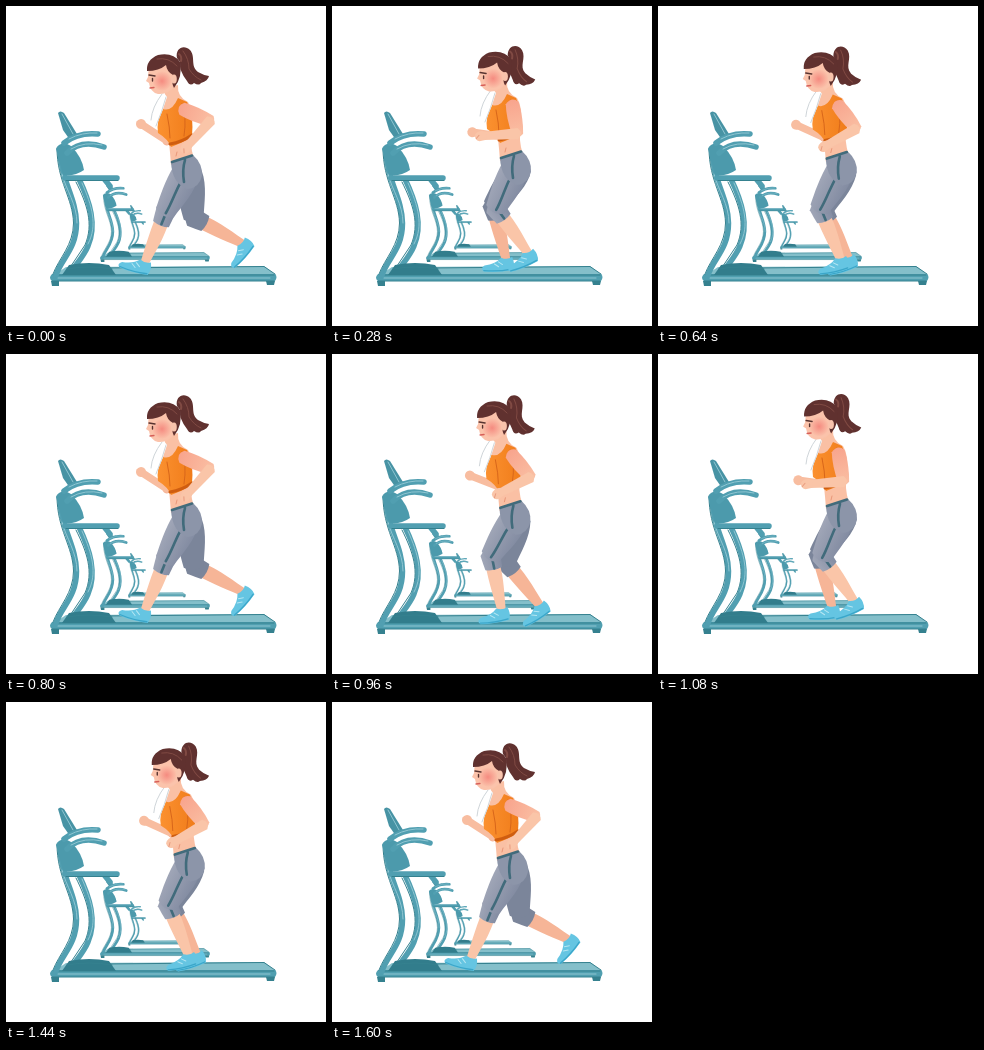
An HTML page without scripts that plays this animation: 320x320 px, repeating every 1640 ms.

```html
<!DOCTYPE html>
<html lang="en">
<head>
<meta charset="utf-8">
<title>Treadmill run</title>
<style>
/* n = near side, f = far side; t thigh, s shin, k foot, u upper arm, a forearm; p = ponytail */
@property --nt { syntax: "<angle>"; inherits: true; initial-value: 0deg }
@property --ns { syntax: "<angle>"; inherits: true; initial-value: 0deg }
@property --nk { syntax: "<angle>"; inherits: true; initial-value: 0deg }
@property --ft { syntax: "<angle>"; inherits: true; initial-value: 0deg }
@property --fs { syntax: "<angle>"; inherits: true; initial-value: 0deg }
@property --fk { syntax: "<angle>"; inherits: true; initial-value: 0deg }
@property --nu { syntax: "<angle>"; inherits: true; initial-value: 0deg }
@property --na { syntax: "<angle>"; inherits: true; initial-value: 0deg }
@property --fu { syntax: "<angle>"; inherits: true; initial-value: 0deg }
@property --fa { syntax: "<angle>"; inherits: true; initial-value: 0deg }
@property --p { syntax: "<angle>"; inherits: true; initial-value: 0deg }
@property --x { syntax: "<length>"; inherits: true; initial-value: 0px }
@property --y { syntax: "<length>"; inherits: true; initial-value: 0px }

html, body { margin: 0; width: 100%; height: 100%; overflow: hidden; background: #fff }
svg { display: block; width: 100vw; height: 100vh }

/* Two 800 ms strides, then one 40 ms hold; steps of 40 ms */
@keyframes run {
  0%, 48.7805%, 97.561%, 100% {
    --nt: 28deg; --ns: -6deg; --nk: -7deg; --ft: -6deg; --fs: -56deg; --fk: 14deg;
    --nu: -67deg; --na: 109deg; --fu: 4deg; --fa: 119deg; --p: 0deg; --x: 0px; --y: 0px;
    animation-timing-function: steps(2);
  }
  4.878%, 53.6585% {
    --nt: 37deg; --ns: -32deg; --nk: -5deg; --ft: 2.5deg; --fs: -57deg; --fk: 4deg;
    --nu: -60deg; --na: 108deg; --fu: 2deg; --fa: 118deg; --p: 10deg; --x: 2px; --y: -1px;
    animation-timing-function: steps(5);
  }
  17.0732%, 65.8537% {
    --nt: 26deg; --ns: -62deg; --nk: 14deg; --ft: 35deg; --fs: -49deg; --fk: 11deg;
    --nu: -10deg; --na: 96deg; --fu: -10deg; --fa: 108deg; --p: 12deg; --x: 3px; --y: -4px;
    animation-timing-function: steps(3);
  }
  24.3902%, 73.1707% {
    --nt: -6deg; --ns: -56deg; --nk: 14deg; --ft: 28deg; --fs: -6deg; --fk: -7deg;
    --nu: -4deg; --na: 94deg; --fu: -9deg; --fa: 112deg; --p: 0deg; --x: 0px; --y: 0px;
    animation-timing-function: steps(2);
  }
  29.2683%, 78.0488% {
    --nt: 2.5deg; --ns: -57deg; --nk: 4deg; --ft: 37deg; --fs: -32deg; --fk: -5deg;
    --nu: -10deg; --na: 95deg; --fu: -5deg; --fa: 113deg; --p: 10deg; --x: 2px; --y: -1px;
    animation-timing-function: steps(5);
  }
  41.4634%, 90.2439% {
    --nt: 35deg; --ns: -49deg; --nk: 11deg; --ft: 26deg; --fs: -62deg; --fk: 14deg;
    --nu: -45deg; --na: 100deg; --fu: 0deg; --fa: 116deg; --p: 12deg; --x: 3px; --y: -4px;
    animation-timing-function: steps(3);
  }
}
#runner { animation: run 1640ms linear infinite; transform: translate(var(--x), var(--y)) }
#head { transform: translate(calc(var(--x) * .7), calc(var(--x) * .5)) }
#ponytail { transform-origin: 172px 50px; transform: rotate(var(--p)) }

.near.thigh { transform: translate(180px, 167px) rotate(var(--nt)) }
.near .shin { transform: translate(0, 44px) rotate(var(--ns)) }
.near .foot { transform: translate(0, 56px) rotate(var(--nk)) }
.far.thigh { transform: translate(183px, 168px) rotate(var(--ft)) }
.far .shin { transform: translate(0, 44px) rotate(var(--fs)) }
.far .foot { transform: translate(0, 56px) rotate(var(--fk)) }
.near.arm { transform: translate(178px, 103px) rotate(var(--nu)) }
.near .fore { transform: translate(0, 29px) rotate(var(--na)) }
.far.arm { transform: translate(163px, 106px) rotate(var(--fu)) }
.far .fore { transform: translate(0, 29px) rotate(var(--fa)) }
.far .shin { --skin: #f6b597 }

.line { fill: none; stroke-linecap: round; stroke-linejoin: round }
.tube { stroke: #519fb1; stroke-width: 5.5 }
.edge { stroke: #35818f; stroke-width: 1 }
.shine { stroke: #8fc6d2; stroke-width: 1 }
.near { --cloth: url(#cloth); --skin: #fac5a8 }
.far { --cloth: #7b859a; --skin: #f8bda0 }
.cloth { fill: var(--cloth) }
.skin { fill: var(--skin) }
.stripe { stroke: #416b7b; stroke-width: 2.6 }
</style>
</head>
<body>
<svg viewBox="0 0 320 320">
  <defs>
    <linearGradient id="cloth">
      <stop offset="0" stop-color="#a0a6b7"/>
      <stop offset="1" stop-color="#838ca2"/>
    </linearGradient>
    <linearGradient id="top">
      <stop offset="0" stop-color="#fb9130"/>
      <stop offset="1" stop-color="#f07c1a"/>
    </linearGradient>
    <linearGradient id="shoulder" x2="0" y2="1">
      <stop offset="0" stop-color="#f8a48d"/>
      <stop offset="1" stop-color="#fac0a4"/>
    </linearGradient>
    <radialGradient id="blush">
      <stop offset="0" stop-color="#f58b80"/>
      <stop offset="1" stop-color="#f58b80" stop-opacity="0"/>
    </radialGradient>

    <g id="treadmill">
      <path d="M60 261L258 260L270 269H48Z" fill="#84bfca"/>
      <path class="line edge" d="M98 262L258 260.5L269 268"/>
      <path d="M46 268H269Q272 271 269 275H46Q42 272 46 268Z" fill="#509fb0"/>
      <path class="line edge" d="M48 269H268M46 275H268"/>
      <path class="line shine" d="M52 272H264"/>
      <path d="M45 275H53V280H46ZM260 275H269L268 279H261Z" fill="#35818f"/>
      <path class="line tube" d="M73 173C84 196 91 219 82 240C78 250 71 257 65 266"/>
      <path class="line shine" d="M76 177C86 200 92 219 82 238"/>
      <path class="line tube" d="M54 142C54 174 70 190 70.5 217C70.5 243 56 252 50 269"/>
      <path class="line shine" d="M56 168C60 184 71 198 71 217"/>
      <path class="line edge" d="M51 142C51 176 67 192 67.5 217C67.5 239 53 252 47 268M70 176C81 198 88 218 79 239L63 263"/>
      <path d="M56 269L63 259Q83 255 103 259L110 269Z" fill="#327d8c"/>
      <path class="line edge" d="M61 263Q83 259 106 263"/>
      <path d="M50 143Q55 134 65 140Q76 151 78 164Q68 171 57 169Z" fill="#4c9aac"/>
      <path d="M52 107Q54 104 58 107L71 128L64 134L57 124Z" fill="#4793a4"/>
      <path class="line shine" d="M56 108L67 128"/>
      <path class="line tube" d="M58 137Q72 126 92 128M61 147Q75 133 98 141"/>
      <path class="line shine" d="M63 133Q76 126 91 127M65 143Q79 135 96 139"/>
      <path class="line tube" d="M59 172H111M99 174L104 180"/>
      <path class="line edge" d="M60 174.5H112"/>
    </g>

    <g id="shoe">
      <path d="M-5 -3Q1 0 6 -3Q9 4 6 10Q-10 12 -23 10Q-27 7 -22 4Q-11 3 -5 -3Z" fill="#65c5e2"/>
      <path class="line" d="M-23 9Q-9 11 5 9" stroke="#3ba6c9" stroke-width="1.3"/>
      <path class="line" d="M-12 3L-8 6M-8 1L-4 4" stroke="#b5e6f2"/>
    </g>
    <path id="calf" d="M-7 6C-7 27 -5 44 -4 58H4C5 44 9 25 7 6Z"/>
    <path id="cuff" d="M-10 -2Q-9 7 -8 13Q1 16 9 13L10 -2Q0 -14 -10 -2Z"/>
    <path id="thigh" d="M-14 -2C-15 18 -12 32 -10 45Q0 52 10 45C12 30 17 14 13 -2Q0 -16 -14 -2Z"/>
  </defs>

  <use href="#treadmill" transform="translate(110.8 172.1) scale(.255)"/>
  <use href="#treadmill" transform="translate(72.7 120.2) scale(.485)"/>
  <use href="#treadmill"/>

  <g id="runner">
    <g class="far arm">
      <path class="line" d="M0 0V29" stroke="#f4b092" stroke-width="9"/>
      <g class="fore">
        <path class="line" d="M0 0V29" stroke="#f8bda0" stroke-width="7.5"/>
        <circle class="skin" cy="31" r="5"/>
      </g>
    </g>

    <g class="far thigh">
      <g class="shin">
        <use class="skin" href="#calf"/>
        <g class="foot"><use href="#shoe"/></g>
        <use class="cloth" href="#cuff"/>
      </g>
      <use class="cloth" href="#thigh"/>
    </g>

    <!-- torso -->
    <path d="M160 82L172 79Q171 91 182 96Q188 105 186 125Q183 137 188 153L165 159Q164 145 163 137L154 110Z" fill="#fac0a4"/>
    <path class="line" d="M171 146l-1 4" stroke="#e89779"/>

    <g class="near thigh">
      <g class="shin">
        <use class="skin" href="#calf"/>
        <g class="foot"><use href="#shoe"/></g>
        <use class="cloth" href="#cuff"/>
        <path class="line stripe" d="M1 0V13"/>
      </g>
      <use class="cloth" href="#thigh"/>
      <path class="line stripe" d="M1 -6C-3 12 2 30 1 45"/>
    </g>
    <path d="M165 156L187 149Q197 158 196 170Q193 182 182 183Q166 178 165 156Z" fill="#8c95a9"/>
    <path class="line stripe" d="M166 156L186 149.5M179 154Q176 164 178 176"/>

    <path d="M172 92L181 96Q188 111 186 131Q176 137 165 141Q162 133 152 127Q150 115 157 103Q166 106 172 92Z" fill="url(#top)"/>
    <path class="line" d="M164 138Q176 136 186 129" stroke="#cf5d10" stroke-width="3"/>
    <path class="line" d="M176 98Q181 111 178 130M161 108Q164 122 164 132" stroke="#d8661a"/>

    <!-- towel -->
    <path d="M158 87Q147 101 145 115L150 120Q157 105 161 91Z" fill="#fff"/>
    <path class="line" d="M156 88Q146 101 145 114M160 91Q156 106 150 120" stroke="#cfd5d9"/>

    <g id="head">
      <g id="ponytail">
        <path d="M171 52C169 42 178 38 184 44C190 51 184 60 192 66Q197 69 203 70Q202 75 195 77Q193 80 188 77Q184 81 181 75Q173 65 174 56Z" fill="#60312f"/>
        <path class="line" d="M177 45Q183 53 183 63Q188 71 195 74" stroke="#804a43"/>
      </g>
      <path d="M144 59Q142 66 142 71L140 75L143 77Q144 86 152 88Q162 89 170 79L171 58Q157 49 144 59Z" fill="#fbc3ab"/>
      <circle cx="156" cy="75" r="10" fill="url(#blush)"/>
      <path d="M141 65Q140 54 152 49Q167 46 174 56Q177 71 168 82Q165 77 167 69Q161 66 160 59Q153 65 141 65Z" fill="#60312f"/>
      <path class="line" d="M151 53Q163 51 171 60" stroke="#804a43"/>
      <ellipse cx="168" cy="73" rx="2.8" ry="4.5" fill="#f8c3ac"/>
      <path class="line" d="M143 69L149 70M146.5 72.5V75" stroke="#583330" stroke-width="1.4"/>
      <path class="line" d="M144 82L148 81.5" stroke="#d75f59" stroke-width="1.3"/>
      <path class="line" d="M173 48Q176 50 175 55" stroke="#804a43" stroke-width="2"/>
    </g>

    <g class="near arm">
      <path d="M-7 -2Q0 -9 6 -2Q8 14 5 30Q0 35 -6 29Q-9 12 -7 -2Z" fill="url(#shoulder)"/>
      <g class="fore">
        <path class="skin" d="M-5.5 0Q0 -6 5.5 0L4 34H-4Z"/>
        <path class="skin" d="M-4 32Q-7 39 -2 43Q4 44 5 39L4 32Z"/>
        <path class="line" d="M-1 39L2 42" stroke="#e89b7f"/>
      </g>
    </g>
  </g>
</svg>
</body>
</html>
```
